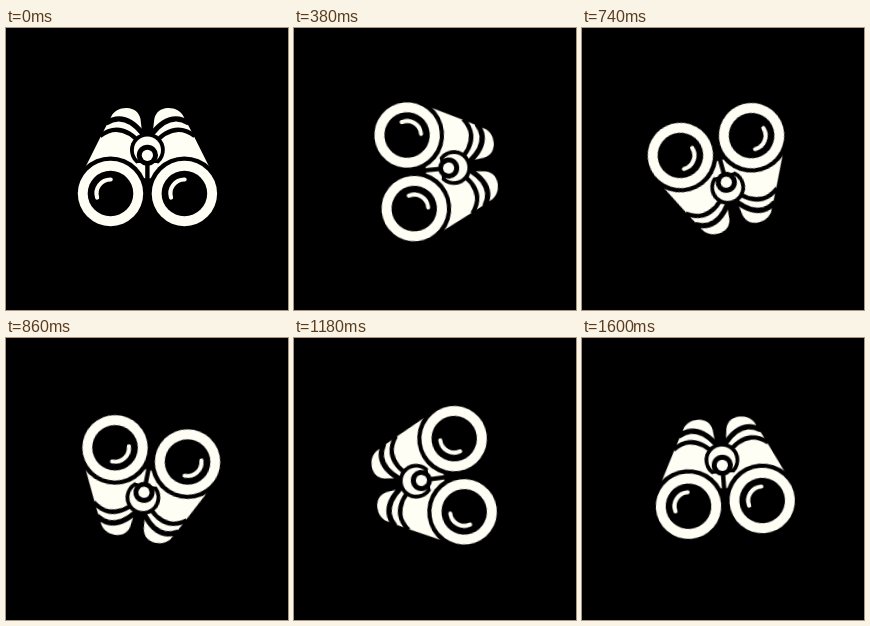
An HTML page for the animation above (1.62 s loop, 282 px wide and 282 px high).

```html
<!DOCTYPE html>
<html lang="en">
<head>
<meta charset="utf-8">
<title>Spinning binoculars</title>
<style>
  html, body { margin: 0; width: 100%; height: 100%; overflow: hidden; background: #000; }
  svg { display: block; width: 100vw; height: 100vh; }
  .spin { transform-origin: 141px 141px; animation: spin 1620ms steps(81, end) infinite; }
  @keyframes spin { to { transform: rotate(360deg); } }
  .w { fill: #fffef5; }
  .line { fill: none; stroke: #000; stroke-width: 4.4; }
  .thick { stroke-width: 5.2; }
  .glint { fill: none; stroke: #fffef5; stroke-width: 4.2; stroke-linecap: round; }
</style>
</head>
<body>
<svg viewBox="0 0 282 282">
  <defs>
    <g id="barrel">
      <path class="w" d="M76 146 L97 104 L105 89 C108 82.5 114 79.8 121 80 C128 80.4 133 84 134.5 91 L136 104 L139 150 L104 166Z"/>
      <path class="line thick" d="M100 95 Q119 83 137 106"/>
      <path class="line" d="M94 108 Q115 92 136 117"/>
    </g>
    <g id="lens">
      <circle r="37"/>
      <circle class="w" r="32.7"/>
      <circle r="22.8"/>
      <path class="glint" d="M-13.4 4 A14 14 0 0 1 0.2 -14"/>
    </g>
  </defs>
  <rect width="282" height="282"/>
  <g class="spin">
    <use href="#barrel"/>
    <use href="#barrel" transform="translate(282.8 0) scale(-1 1)"/>
    <!-- hinge -->
    <circle cx="141.4" cy="122" r="17.4"/>
    <path class="w" d="M131 135 H151.8 L149 146 L141.4 152 L133.8 146Z"/>
    <circle class="w" cx="141.4" cy="122" r="13.6"/>
    <circle cx="141.4" cy="127.3" r="10.6"/>
    <circle class="w" cx="141.4" cy="127.3" r="5.6"/>
    <path class="line" d="M141.4 135 V156"/>
    <use href="#lens" x="104.5" y="165.5"/>
    <use href="#lens" x="178.4" y="165.5"/>
  </g>
</svg>
</body>
</html>
```
